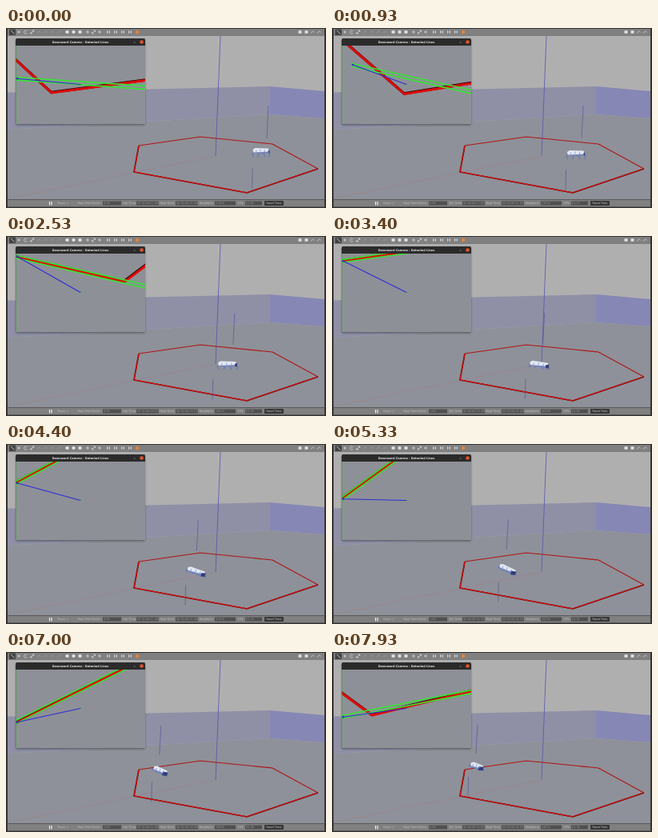
Recreate the animation shown at these times as an HTML page. Size 400 by 225 pixels, loop 8 s.

```html
<!DOCTYPE html>
<html lang="en">
<head>
<meta charset="utf-8">
<title>Line following robot</title>
<style>
html, body { margin: 0; width: 100%; height: 100%; overflow: hidden; background: #333; }
svg { display: block; width: 100%; height: 100%; }
text { font-family: "DejaVu Sans", sans-serif; }
</style>
</head>
<body>
<svg viewBox="0 0 400 225">
  <defs>
    <clipPath id="view"><rect x="12" y="22" width="162" height="98"/></clipPath>
    <filter id="soft" x="-10%" y="-10%" width="120%" height="125%"><feGaussianBlur stdDeviation="1.2"/></filter>
  </defs>

  <rect width="400" height="225" fill="#333"/>
  <rect x="2" y="10" width="396" height="204" fill="#b0afb0"/>
  <path d="M2 127L330 108L398 113V214H2Z" fill="#8e9199"/>
  <path d="M2 80.500L330 73V108L2 127Z" fill="#8f90a6"/>
  <path d="M330 73L398 79V113L330 108Z" fill="#8687b4"/>
  <path d="M2 213L262 160" stroke="#a07a86" stroke-width=".5"/>
  <path d="M268 10L262 160" stroke="#5555ae" stroke-width=".8"/>
  <g fill="none" stroke-linejoin="round">
    <path d="M166 147L243 136L333 145L390 176" stroke="#b01414" stroke-width="1.100"/>
    <path d="M390 176L301 206L160 180L166 147" stroke="#5c0a0a" stroke-width="1.700"/>
    <path d="M390 175.800L301 205.800L160 179.800L166 147" stroke="#d01010" stroke-width="1.200"/>
  </g>
  <path id="poles" stroke="#4d4d96" stroke-width=".6"/>
  <g id="robot">
    <path id="legs" fill="none" stroke="#6478b8" stroke-width="1.300" stroke-linejoin="round"/>
    <path id="side" fill="#7384ba"/>
    <path id="top" fill="#e3e8f5"/>
    <path id="end" fill="#303c78"/>
    <path id="marks" stroke="#8799cf" stroke-width=".9"/>
  </g>

  <rect x="2" y="1" width="396" height="9" fill="#808080"/>
  <g id="tools" fill="none" stroke="#d8d8d8" stroke-width=".8"></g>
  <rect x="2" y="214.500" width="396" height="9" fill="#808080"/>
  <g id="status" font-size="3.400"></g>

  <rect x="12" y="14" width="162" height="107.500" rx="2" opacity=".35" filter="url(#soft)"/>
  <path d="M12 22V15Q12 13 14 13H172Q174 13 174 15V22Z" fill="#2c2b2c"/>
  <text x="93" y="19" font-size="3.500" font-weight="bold" fill="#e4e4e4" text-anchor="middle">Downward Camera - Detected Lines</text>
  <path d="M159.500 18H161.500" stroke="#aaa" stroke-width=".6"/>
  <circle cx="169.500" cy="17.500" r="2.300" fill="#e0502c"/>
  <g clip-path="url(#view)">
    <rect x="12" y="22" width="162" height="98" fill="#8e9097"/>
    <path id="under" fill="none" stroke="#2c0606" stroke-width="3.400" transform="translate(-.4 -.6)"/>
    <path id="tape" fill="none" stroke="#e00a0a" stroke-width="3"/>
    <path id="fit" stroke="#35e435" stroke-width="1.600"/>
    <path id="aim" stroke="#2c2cd8" stroke-width="1.100"/>
    <circle id="goal" r="1.400" fill="#3434cf"/>
    <circle cx="93.500" cy="70.500" r=".8" fill="#3da04a"/>
    <path d="M12.300 22V120" stroke="#3a9c3a" stroke-width=".7"/>
  </g>
</svg>
<script>
const $ = id => document.getElementById(id);
const draw = (id, d) => $(id).setAttribute('d', d);

const LOOP = 8000, FPS = 15, LAST = 119;
const { PI, sin, cos, exp, min, max } = Math;
const clamp = v => min(1, max(0, v));
const mix = (a, b, u) => a + (b - a) * u;
const smooth = (a, b, v) => {
  const u = clamp((v - a) / (b - a));
  return u * u * (3 - 2 * u);
};
const slope = deg => Math.tan(deg * PI / 180);

function toolbar() {
  const icon = {
    cross: 'M-2 0H2M0 -2V2',
    ring: 'M1.800 -1A2 2 0 1 0 2 1',
    scale: 'M-1.800 1.800L1.800 -1.800M0 -2H2V0M-2 0V2H0',
    arc: 'M-2 1.500Q0 -2.500 2 .5',
    box: 'M-1.600 -1.500H1.600V1.500H-1.600Z',
    ball: 'M-1.800 0A1.800 1.800 0 1 0 1.800 0A1.800 1.800 0 1 0 -1.800 0',
    bars: 'M-1.500 -2V2M1.500 -2V2M-1.500 0H1.500'
  };
  const group = (x, gap, names) => names.split(' ').map((n, i) => {
    const fill = n === 'box' || n === 'ball' ? '#e4e4e4' : 'none';
    const fade = n === 'arc' && x < 50 ? .35 : 1;
    return `<path transform="translate(${x + i * gap} 5)" d="${icon[n]}" fill="${fill}" opacity="${fade}"/>`;
  }).join('');
  $('tools').innerHTML = `<rect x="4" y="1.500" width="8" height="7.500" fill="#444" stroke="none"/><path d="M6 3L10.500 7.500"/>`
    + group(16, 8.4, 'cross ring scale arc arc arc arc')
    + group(76.5, 8, 'box ball box')
    + group(102, 7.5, 'cross scale cross')
    + group(128, 9, 'bars bars bars bars')
    + `<circle cx="164" cy="5" r="2.200" fill="#e58236" stroke="none"/>`
    + group(367.5, 8, 'box box arc arc');
}

function statusBar() {
  const label = (x, t) => `<text x="${x}" y="220.300" fill="#c4c4c4">${t}</text>`;
  const field = (x, w, id) =>
    `<rect x="${x}" y="216.500" width="${w}" height="5" fill="#505050"/><text id="${id}" x="${x + 1}" y="220.300" fill="#999"/></text>`
      .replace('/></text>', '></text>');
  $('status').innerHTML = `<path d="M54.500 217V221.500M57 217V221.500" stroke="#eee" stroke-width="1.200"/>`
    + label(64, 'Steps: 1') + label(89.5, 'Real Time Factor:') + field(121, 23, 'rate')
    + label(146, 'Sim Time:') + field(163, 28, 'sim')
    + label(193, 'Real Time:') + field(212, 28, 'real')
    + label(242, 'Iterations:') + field(261, 26, 'count')
    + label(290, 'FPS:') + field(299, 21, 'fps')
    + `<rect x="323" y="216" width="24" height="6" rx=".8" fill="#383838"/>`
    + `<text x="335" y="220.300" text-anchor="middle" fill="#ccc">Reset Time</text>`;
}

// The robot turns along one side of the hexagon; its neighbours bend off by 50 degrees.
function camera(k) {
  const turn = mix(42.5, -36, smooth(8, 80, k)) + 22.4 * clamp((k - 80) / 39) ** 2;
  const locked = smooth(10, 38, k);
  const late = smooth(100, LAST, k);

  const fitTan = slope(mix(4 + k / 2, turn + 2.6 * late, locked));
  const left = 56.7 - 31 * cos(2 * PI * (k - 38) / 134);
  const fitY = x => left + fitTan * (x - 12);

  const side = slope(turn);
  const farX = 57 + 2.4 * k;
  const nearX = 50 - 3.2 * (LAST - k);
  const onLine = left + 7 * late + side * (farX - 12);
  const farY = mix(81, onLine, min(1, k / 38) ** 3);
  const nearY = farY + side * (nearX - farX);
  const line = `M${nearX - 150} ${nearY - 150 * slope(turn + 50)}L${nearX} ${nearY}`
    + `L${farX} ${farY}l150 ${150 * slope(turn - 50)}`;
  draw('under', line);
  draw('tape', line);

  const x = 12 + 12 * max(0, sin(PI * min(k, 28) / 28));
  const gap = 2.1 * Math.hypot(1, fitTan);
  draw('fit', [-gap, gap].map(g => `M${x} ${fitY(x) + g * .8}L174 ${fitY(174) + g}`).join(''));
  draw('aim', `M93 70.500L${x + 2} ${fitY(x)}`);
  $('goal').setAttribute('cx', x + 2);
  $('goal').setAttribute('cy', fitY(x));
}

function robot(k) {
  const p = k / LAST, arch = sin(PI * p);
  const x = 319 - 138 * p + 5 * sin(2 * PI * p) - 3 * arch;
  const y = 154.5 - 11 * p + 12 * arch;
  const h = (21 - 4 * p + 5 * arch) / 2;
  const angle = 26 * max(0, sin(PI * (p - .35) / .85));
  const leg = 1 - .9 * smooth(.15, .7, p);
  $('robot').setAttribute('transform', `translate(${x} ${y}) rotate(${angle})`);

  const limb = (hip, i) => {
    const swing = (i % 2 ? 2 : -2) + sin(k * 1.3 + i * PI) * .8;
    return `M${hip * h} 0l${swing} ${1 + 2 * leg}l${-swing * .6} ${1 + 2.5 * leg}`;
  };
  draw('legs', [-.85, -.5, .5, .85].map(limb).join(''));
  draw('side', `M${-h + 1} -1H${h}V${3 - leg}L${-h + 2} ${3 - leg}Z`);
  draw('top', `M${-h} -2.500L${-h + 3} -4.500L${h - 2} -4L${h} -1V0L${-h + 1} 1Z`);
  const e = 2 + 5 * (1 - leg);
  draw('end', `M${h - e} -1L${h} -2.500V2L${h - e + 1} ${4 - 2 * leg}Z`);
  draw('marks', `M${-h * .6} -2V1M${-h * .1} -3V0M${h * .4} -2.500V1`);

  const topX = x + 1 + 8 * (1 - smooth(.3, .65, p));
  const topY = 97 - 6 * p * p;
  const lowX = x - 11 - 8 * exp(-(((p - .35) / .2) ** 2));
  const lowY = y + 46 - 9 * p;
  draw('poles', `M${topX} ${topY}l-2 ${41 - 5 * p}M${lowX} ${lowY}l.6 -25`);
}

function clock(k) {
  const s = k / FPS;
  const stamp = v => '00 00:00:' + v.toFixed(3).padStart(6, '0');
  $('rate').textContent = (.98 + .01 * (Math.floor(k / 9) % 3)).toFixed(2);
  $('sim').textContent = stamp(27 + s);
  $('real').textContent = stamp(31 + s);
  $('count').textContent = 27000 + Math.round(s * 1000);
  $('fps').textContent = (61.8 + sin(k * .4)).toFixed(2);
}

let start;
function show(now) {
  start ??= now;
  const k = min(LAST, Math.floor(((now - start) % LOOP + 4) * FPS / 1000));
  camera(k);
  robot(k);
  clock(k);
  requestAnimationFrame(show);
}

toolbar();
statusBar();
requestAnimationFrame(show);
</script>
</body>
</html>
```
